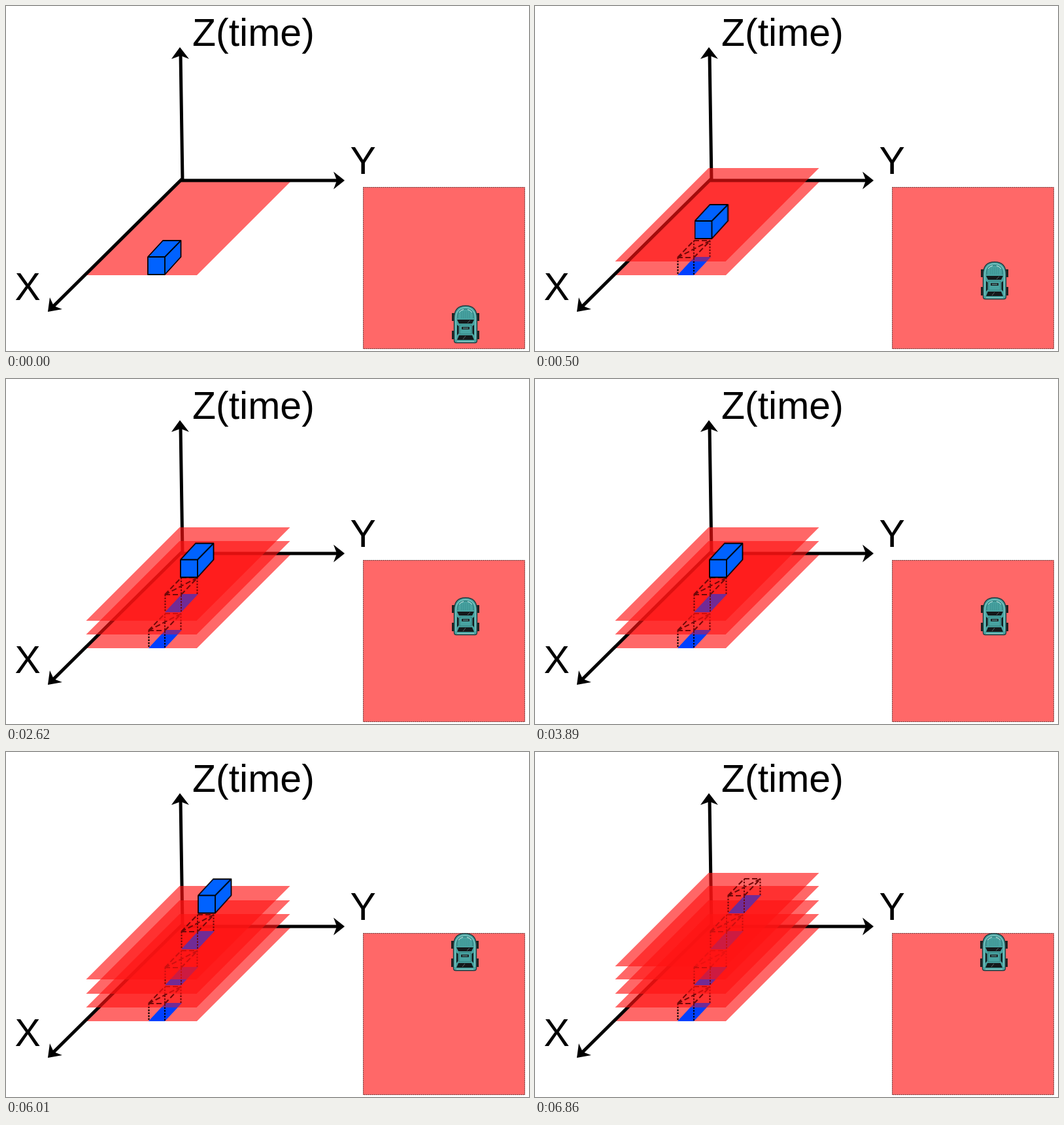
An HTML page that plays this animation: 800x528 px, repeating every 8 s.

```html
<!DOCTYPE html>
<html lang="en">
<head>
<meta charset="utf-8">
<title>Space-time layers</title>
<style>
  html, body { margin: 0; width: 100%; height: 100%; overflow: hidden; background: #fff; }
  svg { display: block; width: 100vw; height: 100vh; }
  text { font: 59px "Liberation Sans", Arial, sans-serif; }
  .tint { opacity: .3; }

  .s1, .s2, .s3, .s4, .box, .car { animation: 8s step-end infinite; }
  .s1 { animation-name: show1; }
  .s2 { animation-name: show2; }
  .s3 { animation-name: show3; }
  .s4 { animation-name: show4; }
  .box { animation-name: climb; }
  .car { animation-name: drive; }

  @keyframes show1 { 0% { visibility: hidden; } 6.25%, 100% { visibility: visible; } }
  @keyframes show2 { 0% { visibility: hidden; } 32.75%, 100% { visibility: visible; } }
  @keyframes show3 { 0% { visibility: hidden; } 59.25%, 100% { visibility: visible; } }
  @keyframes show4 { 0% { visibility: hidden; } 85.75%, 100% { visibility: visible; } }

  @keyframes climb {
    0% { transform: translate(217px, 411px); visibility: visible; }
    6.25% { transform: translate(244.5px, 356px); visibility: visible; }
    32.75% { transform: translate(267px, 303.5px); visibility: visible; }
    59.25% { transform: translate(294px, 246.5px); visibility: visible; }
    85.75%, 100% { transform: translate(294px, 246.5px); visibility: hidden; }
  }
  @keyframes drive {
    0% { transform: translate(682px, 458px); }
    6.25% { transform: translate(682px, 391px); }
    32.75% { transform: translate(682px, 334px); }
    59.25%, 100% { transform: translate(681px, 277px); }
  }
</style>
</head>
<body>
<svg viewBox="0 0 800 528" preserveAspectRatio="none">
  <defs>
    <path id="plane" d="M143 0H312L169 143H0Z" fill="#ff1414" fill-opacity=".645"/>
    <g id="ghost" fill="none" stroke="#000" stroke-width="2">
      <path d="M0 0H25L51 -28H26Z" fill="#0040ff" stroke="none"/>
      <path d="M.5 -27V0M25 -53V0M49.5 -53V-28" stroke-dasharray="2.5 2"/>
      <path d="M25 -53H50M0 -27H25M0 -27L25 -53M25 -27L50 -53M0 -27L50 -53" stroke-dasharray="8 4"/>
    </g>
  </defs>

  <path d="M266 269H435L292 412H122Z" fill="#ff6868"/>

  <g stroke="#000" stroke-width="5">
    <path d="M270 267L267 72M267 267H510M271 263L71 461" fill="none"/>
    <path d="M266 63L280 81L267 76L253 81ZM518 267L501 280.5L506 267L501 253.5ZM64 468L67 446L73 459L86 464Z"
          stroke="none"/>
  </g>

  <text x="285" y="61">Z(time)</text>
  <text x="526.5" y="257">Y</text>
  <text x="13.5" y="450">X</text>

  <!-- each trace lies under the next plane and shows faintly through it -->
  <g class="s1">
    <use href="#ghost" x="218" y="412"/>
    <use href="#plane" x="122.5" y="248"/>
    <use href="#ghost" x="218" y="412" class="tint"/>
  </g>
  <g class="s2">
    <use href="#ghost" x="243" y="357"/>
    <use href="#plane" x="122.5" y="227"/>
    <use href="#ghost" x="243" y="357" class="tint"/>
  </g>
  <g class="s3">
    <use href="#ghost" x="268" y="302"/>
    <use href="#plane" x="122.5" y="205"/>
    <use href="#ghost" x="268" y="302" class="tint"/>
  </g>
  <g class="s4">
    <use href="#ghost" x="295" y="247"/>
    <use href="#plane" x="122.5" y="185"/>
    <use href="#ghost" x="295" y="247" class="tint"/>
  </g>

  <g class="box" stroke="#000" stroke-width="1.8" stroke-linejoin="round">
    <path d="M0 0V-27L23 -52H50.5V-27L26 0Z" fill="#0062ff"/>
    <path d="M0 -27H26V0M26 -27L50.5 -52" fill="none"/>
  </g>

  <rect x="546.5" y="277.5" width="247" height="247" fill="#ff6868"
        stroke="#6b2929" stroke-dasharray="2 1"/>

  <g class="car">
    <path d="M0 12H5V24H0ZM37 12H42V24H37ZM0 39H5V52H0ZM37 39H42V52H37Z" fill="#222"/>
    <path d="M3.5 54V20C3.5 7 10 .8 21 .8S38.5 7 38.5 20V54Q38.5 57.5 35 57.5H7Q3.5 57.5 3.5 54Z"
          fill="#48a3a1" stroke="#263d40" stroke-width="1.4"/>
    <path d="M6 52V20C6 9 12 3.5 21 3.5S36 9 36 20V52" fill="none" stroke="#8fd0cc"/>
    <path d="M9 20V15C10 8 15 6 21 6S32 8 33 15V20" fill="none" stroke="#2e7475"/>
    <path d="M11 11Q14 7 18 6.5M31 11Q28 7 24 6.5" fill="none" stroke="#d5eeea"/>
    <path d="M15 10V20M18 9V20M21 9V20M24 9V20M27 10V20" stroke="#398988" stroke-width=".7"/>
    <path d="M8 22H34L31 28H11ZM11 46H31L34 53H8ZM8 30L10.5 32V43L8 46ZM34 30L31.5 32V43L34 46Z" fill="#14191b"/>
    <path d="M12 30H30V44H12Z" fill="#48a3a1" stroke="#2e7475" stroke-width=".8"/>
    <path d="M15 33H27V37H15Z" fill="#1d2527"/>
    <path d="M17 35H25" stroke="#6fb5b2"/>
    <path d="M24 27L28 23M17 52L21 47" stroke="#596568"/>
    <path d="M8 55.5H34" stroke="#9bd2ce"/>
  </g>
</svg>
</body>
</html>
```
